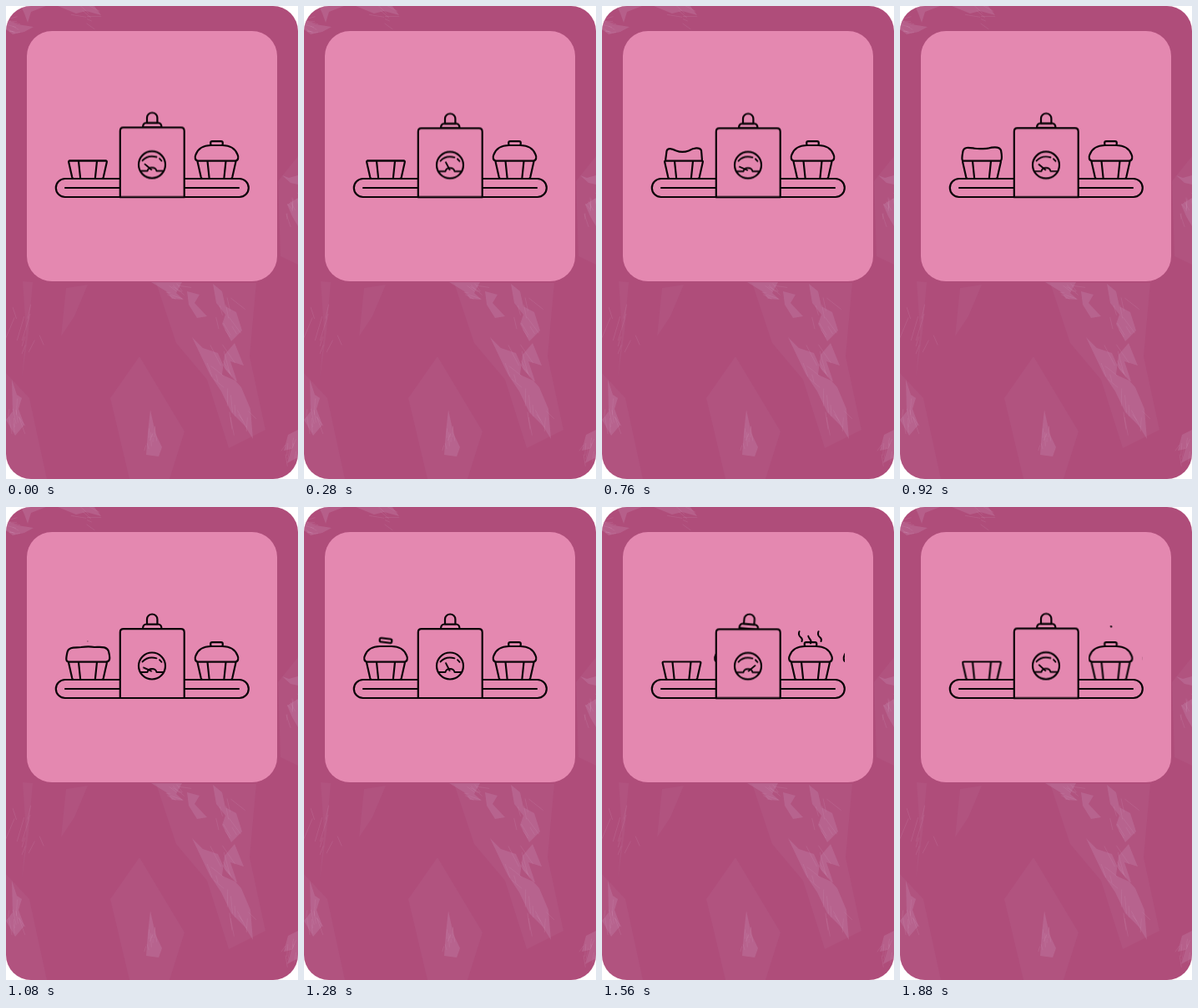
An HTML page that plays this animation: 350 by 567 pixels, repeating every 1.92 s.

```html
<!DOCTYPE html>
<html lang="en">
<head>
<meta charset="utf-8">
<title>Muffin machine</title>
<style>
html, body { margin: 0; width: 100%; height: 100%; overflow: hidden; background: #fff; }
svg { display: block; width: 350px; height: 567px; }
.line { fill: none; stroke: #0b0508; stroke-width: 2.2; stroke-linecap: round; stroke-linejoin: round; }
.solid { fill: #e488b0; }
.foil { fill: #c585ab; opacity: .34; }
.faint { fill: #c585ab; opacity: .1; }
.crease { fill: none; stroke: #d29abb; stroke-width: .7; opacity: .26; }

/* one loop = 1920 ms, 1 % = 19.2 ms */
.belt, .cream, .garnish, .body, .lamp, .needle, .steam path {
  animation: 1920ms ease-in-out infinite both;
}
.belt { animation-name: travel; }
@keyframes travel {
  0%, 67.2% { transform: translateX(0); animation-timing-function: cubic-bezier(.5, 0, .1, 1); }
  86.46%, 100% { transform: translateX(65.5px); }
}

.cream { animation-name: rise; }
@keyframes rise {
  0%, 26% { d: path("M-22 185.5C-22 185.5-22 185.5-20 185.5C-17 185.5-13 185.5-9 185.5C-4 185.5 2 185.5 6 185.5C12 185.5 17 185.5 20 185.5C22 185.5 22 185.5 22 185.5Z"); }
  39.58% { d: path("M-22 185.5C-22 185.5-21 178-20.5 174C-19.5 169.5-14 171-9 173.5C-4 175.5 2 175 6 173.5C12 170 19 169 21 173C21.5 178 22 185.5 22 185.5Z"); }
  56.25% { d: path("M-22 185.5C-27 186-26 181-24.5 174C-23 167-15 168.8-8 168C-3 167.3 3 167 8 168C15 168 23 166.5 25 173C27 181 27 185.5 22 185.5Z"); }
  64%, 100% { d: path("M-22.5 185.5C-26 185.5-26.5 181-25 178C-22 170.5-15 167-7 167C-3 167 3 167 7 167C15 167 22 170.5 25 178C26.5 181 26 185.5 22.5 185.5Z"); }
}

.garnish { animation-name: drop; }
@keyframes drop {
  0%, 54.5% { transform: translateY(161px) scale(0); }
  56.25% { transform: translateY(161px) scale(.1); }
  62.5% { transform: translateY(157px) rotate(14deg) scale(1); }
  66.67% { transform: translateY(160px) rotate(7deg) scale(1); }
  70.8%, 100% { transform: translateY(164.6px) scale(1); }
}

.body { transform-origin: 175px 229px; animation-name: bounce; }
@keyframes bounce {
  0%, 100% { transform: scaleY(1.006); }
  7% { transform: scaleY(1.012); }
  14.58%, 39.58% { transform: scaleY(.995); }
  27% { transform: scaleY(1.004); }
  56.25%, 67% { transform: scaleY(1); }
  73% { transform: scaleY(1.045); }
  81.25% { transform: scaleY(.995); }
  90% { transform: scaleY(1.005); }
}
.lamp { transform-origin: 175px 146px; animation-name: hop; }
@keyframes hop {
  0%, 67%, 92%, 100% { transform: none; }
  73% { transform: translateY(-4px) rotate(-4deg); }
  81.25% { transform: translate(.5px, -.5px) rotate(5deg); }
  87% { transform: rotate(-2deg); }
}

.needle { transform-origin: 175px 197px; animation-name: swing; }
@keyframes swing {
  0%, 100% { transform: rotate(-50deg); }
  14.58% { transform: rotate(-27deg); }
  39.58% { transform: rotate(-66deg); }
  48% { transform: rotate(-50deg); }
  56.25% { transform: rotate(-66deg); }
  66.67% { transform: rotate(-27deg); }
  81.25% { transform: rotate(50deg); }
  97.92% { transform: rotate(-48deg); }
}

.steam path { stroke-width: 2; stroke-dasharray: 1 3; animation-name: puff; animation-timing-function: linear; }
.steam .mid { animation-name: puffMid; }
@keyframes puff {
  0%, 74% { stroke-dashoffset: 1.05; opacity: 0; }
  74.5% { stroke-dashoffset: 1; opacity: 1; }
  86.5%, 88% { stroke-dashoffset: 0; }
  96.8% { stroke-dashoffset: -.97; opacity: 1; }
  96.9%, 100% { stroke-dashoffset: -1.05; opacity: 0; }
}
@keyframes puffMid {
  0%, 75.5% { stroke-dashoffset: 1.05; opacity: 0; }
  76% { stroke-dashoffset: 1; opacity: 1; }
  88%, 89% { stroke-dashoffset: 0; }
  98% { stroke-dashoffset: -.98; opacity: 1; }
  99.8% { stroke-dashoffset: -1; opacity: 1; }
  99.9%, 100% { stroke-dashoffset: -1.05; opacity: 0; }
}
</style>
</head>
<body>
<svg viewBox="0 0 350 567">
  <defs>
    <clipPath id="card"><rect width="350" height="567" rx="30"/></clipPath>
    <clipPath id="track"><rect x="58.5" y="100" width="232.5" height="130"/></clipPath>
    <filter id="soft"><feGaussianBlur stdDeviation=".7"/></filter>
    <path id="cup" d="M-21.5 185.5H21.5Q23.2 185.5 22.8 187.2L18.8 205Q18.3 207 16.5 207H-16.5Q-18.3 207-18.8 205L-22.8 187.2Q-23.2 185.5-21.5 185.5ZM-11 186L-8.8 207M11 186L8.8 207"/>
    <path id="cap" class="solid" d="M-22.5 185.5C-26 185.5-26.5 181-25 178C-22 170.5-15 167-7 167H7C15 167 22 170.5 25 178C26.5 181 26 185.5 22.5 185.5Z"/>
    <rect id="bar" class="solid" x="-7.3" y="-2.4" width="14.6" height="4.8" rx="2"/>
    <g id="muffin">
      <use href="#cup"/><use href="#cap"/><use href="#bar" y="164.6"/>
    </g>
  </defs>

  <g clip-path="url(#card)">
    <rect width="350" height="567" fill="#af4d7a"/>
    <g filter="url(#soft)">
      <path class="foil" d="M0 16L14 22 33 25 22 31 8 34 0 28ZM18 0H48L30 7 26 20 22 9ZM62 0H106L114 11 96 6 84 9ZM350 203L339 206 331 203 341 212 350 214ZM350 230L337 238 343 252 350 264Z"/>
      <path class="foil" d="M174 331H211L204 344 213 352 199 351 192 342ZM217 342L232 346 226 356 241 372 229 374 219 358ZM248 333L259 342 263 360 276 367 283 389 270 402 259 381 263 370 252 356Z"/>
      <path class="foil" d="M223 397L236 410 254 416 263 436 282 457 293 483 296 519 286 503 270 487 258 462 244 441ZM259 442L277 450 269 426 285 431 274 404 262 418Z"/>
      <path class="foil" d="M173 484L179 512 187 529 183 540 168 538 170 511ZM7 448L13 466 19 470 15 483 22 502 11 515 0 496 8 486ZM350 508L338 514 333 533 342 531 337 548 350 541Z"/>
      <path class="faint" d="M20 330L32 331 27 390 19 446 24 390ZM72 338L98 334 82 372 66 396ZM180 332H300L292 420 311 508 267 530 241 448 204 404ZM0 440L28 470 49 567H0ZM125 470L160 420 214 510 196 567H148ZM350 180L326 210 329 300 350 310Z"/>
    </g>
    <g id="creases"></g>
    <rect x="25" y="30" width="300" height="300" rx="30" fill="#e488b0"/>
  </g>

  <g class="line">
    <rect x="59.8" y="207" width="231" height="22" rx="11"/>
    <path d="M71 218H279"/>
    <g clip-path="url(#track)">
      <g class="belt">
        <use href="#cup" x="32.5"/>
        <g transform="translate(98)">
          <use href="#cup"/>
          <path class="cream solid" d="M-22 185.5H22Z"/>
          <g class="garnish"><use href="#bar"/></g>
        </g>
        <g transform="translate(187)">
          <use href="#muffin"/>
          <g class="steam">
            <path pathLength="1" d="M-10.5 161C-8 156-15 157-14 151C-13 146-9 146-11 140"/>
            <path class="mid" pathLength="1" d="M0 163.500C3 159-4 158-2.500 153C-1 149 2.500 149 .5 143"/>
            <path pathLength="1" d="M12.500 161C15 156 8 157 9 151C10 146 14 146 12 140"/>
          </g>
        </g>
        <use href="#muffin" x="252.5"/>
      </g>
    </g>

    <g class="body">
      <g class="lamp">
        <path class="solid" d="M164 146Q164 140.500 168.500 140.500H182Q186.500 140.500 186.500 146Z"/>
        <path class="solid" d="M169 140.500V134.500A6.200 6 0 0 1 181.400 134.500V140.500Z"/>
      </g>
      <path class="solid" d="M136.800 229V150.200Q136.800 146.200 140.800 146.200H209.700Q213.700 146.200 213.700 150.200V229Z"/>
      <circle cx="175" cy="190.500" r="16"/>
      <g stroke-width="1.9">
        <path d="M163.500 185.500Q170 178.500 180.500 181.300M184 183.200L186.500 185.800"/>
        <path d="M161 198H169.500A5.600 5 0 0 1 180.500 198H189"/>
        <path class="needle" d="M175 196V186"/>
      </g>
    </g>
  </g>
</svg>
<script>
// Fine foil creases: seeded strokes scattered around [x, y, spread, slope angle].
let seed = 11;
const rand = () => (seed = seed * 16807 % 2147483647) / 2147483647;
const spots = [
  [8, 25, 14, .2], [88, 5, 20, .3], [343, 235, 18, 1.2], [200, 342, 18, .5],
  [262, 370, 26, 1.1], [250, 425, 28, 1], [278, 478, 25, 1.2],
  [176, 515, 18, 1.6], [12, 484, 22, 1.3], [342, 530, 16, 1.8], [25, 385, 35, 1.6]
];
let d = "";
for (const [x, y, spread, angle] of spots) {
  for (let i = 0; i < 9; i++) {
    const a = angle + (rand() - .5) * .9, len = spread * (.3 + rand() * .7);
    const px = x + (rand() - .5) * spread, py = y + (rand() - .5) * spread * 1.6;
    d += `M${px.toFixed(1)} ${py.toFixed(1)}l${(Math.cos(a) * len).toFixed(1)} ${(Math.sin(a) * len).toFixed(1)}`;
  }
}
document.getElementById("creases").innerHTML = `<path class="crease" d="${d}"/>`;
</script>
</body>
</html>
```
